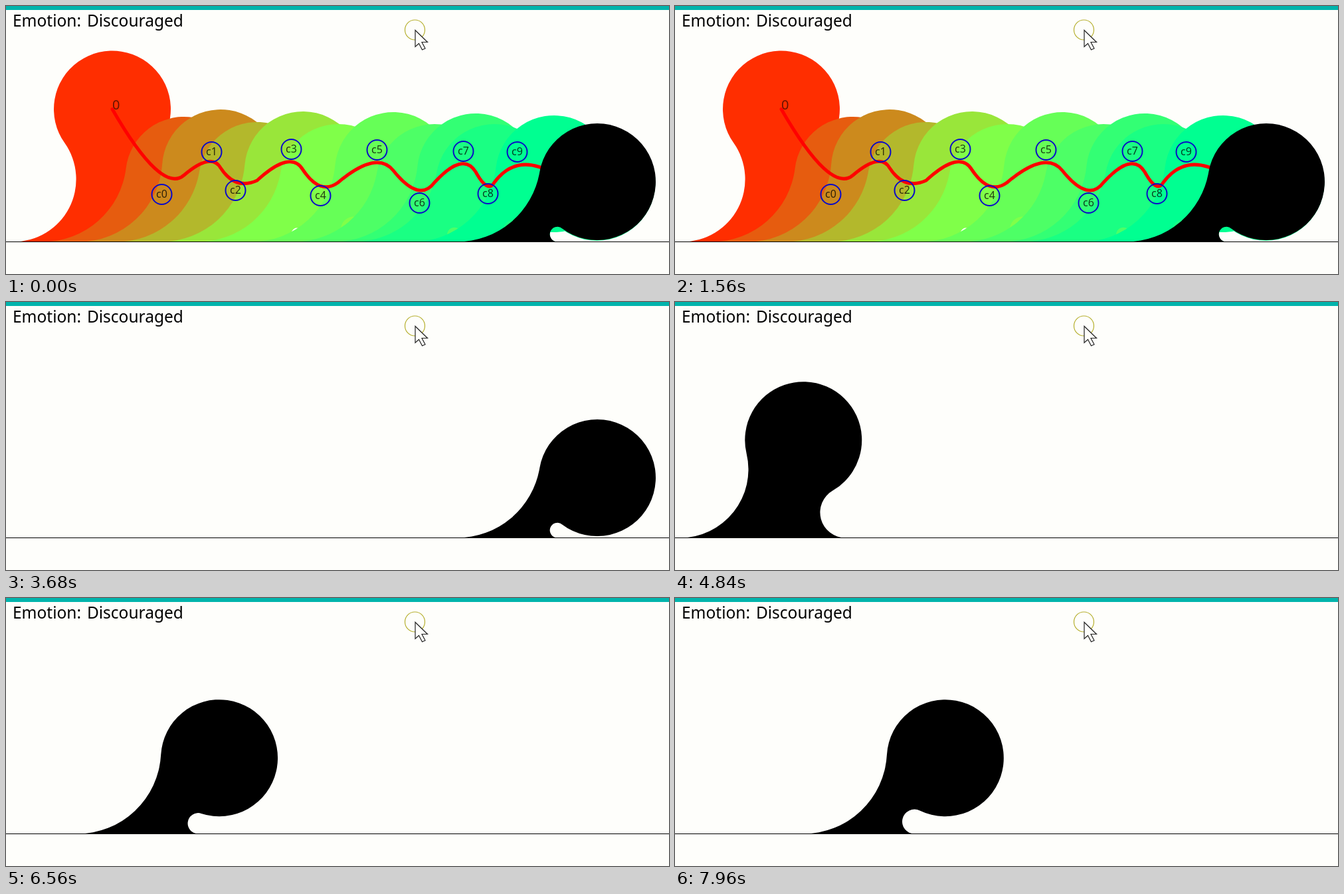
Recreate the animation shown at these times as an HTML page. Size 998x404 px, loop 8 s.

```html
<!DOCTYPE html>
<html lang="en">
<head>
<meta charset="utf-8">
<title>Emotion: Discouraged</title>
<style>
  html, body { margin: 0; width: 100%; height: 100%; overflow: hidden; background: #fefefb; }
  svg { display: block; width: 998px; height: 404px; font-family: "Noto Sans", "Open Sans", sans-serif; }
  .title { font-size: 24.5px; word-spacing: 2.5px; fill: #000; }
  .start { font-size: 20px; fill: #000; opacity: .6; }
  .line { fill: none; stroke: #f00; stroke-width: 5; stroke-linejoin: round; stroke-linecap: round; }
  .ring { fill: none; stroke: #0a0ac8; stroke-width: 2; }
  .tag { font-size: 16px; fill: #000; opacity: .75; text-anchor: middle; }
</style>
</head>
<body>
<svg viewBox="0 0 998 404">
  <rect width="998" height="404" fill="#fefefb"/>
  <rect width="998" height="6" fill="#00b4ac"/>
  <text class="title" x="10" y="31">Emotion: Discouraged</text>
  <g id="trace"></g>
  <path id="body"/>
  <rect y="355" width="998" height="1"/>
  <circle cx="615.5" cy="36" r="15" fill="none" stroke="#b6b030" stroke-width="1.2"/>
  <path d="M616 36.5V61.5L621.5 56.5L626.5 66L631 64L626 54.5H634.5Z" fill="#fefefb" stroke="#222" stroke-width="1.2"/>
</svg>
<script>
const LOOP = 8000, CLEAR = 3200, RESTART = 4480;
const MOVE = 4597, STEP = 1015; // start of the walk, time per curve
const HEAD = 88, GROUND = 355.5;
const END = [890, 265], LAST = 11;

// Quadratic curves: stop, control, stop, control, ... stop
const route = [
  [160, 155.5], [234, 284], [268, 255], [309, 220], [323, 244], [345, 278], [378, 263],
  [429, 216], [447, 247], [473, 286], [500, 266], [558, 217], [583, 248], [622, 297],
  [645, 266], [688, 219], [707, 250], [725, 283], [735, 266], [769, 220], [825, 253]
];
const stops = route.filter((_, i) => i % 2 === 0);
const ctrls = route.filter((_, i) => i % 2);

const color = i => `rgb(${255 - 25.5 * i}, ${Math.min(255, 46 + 46 * i)}, ${14.5 * i})`;

function along(u) {
  const i = Math.floor(u), t = u - i, s = 1 - t;
  return [0, 1].map(k => s * s * stops[i][k] + 2 * s * t * ctrls[i][k] + t * t * stops[i + 1][k]);
}

// Head circle joined to the ground by two tangent fillets
function shape([x, y], u) {
  const h = GROUND - y;
  const upright = Math.max(0, 1 - u / .89);
  const R = 126 - 31.5 * upright;
  const backX = x - Math.sqrt((HEAD + R) ** 2 - (R - h) ** 2);
  const dx = Math.max(-60, -11.5 - 10.5 * u) + 106 * upright;
  const r = Math.max(.1, (dx * dx + h * h - HEAD * HEAD) / (2 * (HEAD + h)));
  const touch = (cx, rad) => {
    const k = HEAD / (HEAD + rad);
    return `${x + (cx - x) * k} ${y + (GROUND - rad - y) * k}`;
  };
  return `M${backX} ${GROUND}A${R} ${R} 0 0 0 ${touch(backX, R)}` +
    `A${HEAD} ${HEAD} 0 1 1 ${touch(x + dx, r)}` +
    `A${r} ${r} 0 ${dx < 0 ? 1 : 0} 0 ${x + dx} ${GROUND}Z`;
}

const trace = document.getElementById('trace');
const body = document.getElementById('body');

function add(tag, attrs, text) {
  const el = document.createElementNS('http://www.w3.org/2000/svg', tag);
  for (const k in attrs) el.setAttribute(k, attrs[k]);
  if (text) el.textContent = text;
  trace.append(el);
}

stops.forEach((p, i) => add('path', { d: shape(p, i), fill: color(i) }));
add('path', { d: shape([END[0] - .5, END[1] + .8], LAST), fill: color(10) });
add('text', { class: 'start', x: 160, y: 156 }, '0');
add('path', {
  class: 'line',
  d: `M${stops[0]}` + ctrls.map((c, i) => `Q${c} ${stops[i + 1]}`).join('')
});
ctrls.forEach(([x, y], i) => {
  add('circle', { class: 'ring', cx: x + .5, cy: y, r: 15 });
  add('text', { class: 'tag', x: x + .5, y: y + 5 }, 'c' + i);
});

function frame(now) {
  const t = now % LOOP;
  trace.style.display = t < CLEAR ? '' : 'none';
  if (t < RESTART) {
    body.setAttribute('d', shape(END, LAST));
  } else {
    const u = Math.max(0, (t - MOVE) / STEP);
    body.setAttribute('d', shape(along(u), u));
  }
  requestAnimationFrame(frame);
}
frame(0);
</script>
</body>
</html>
```
